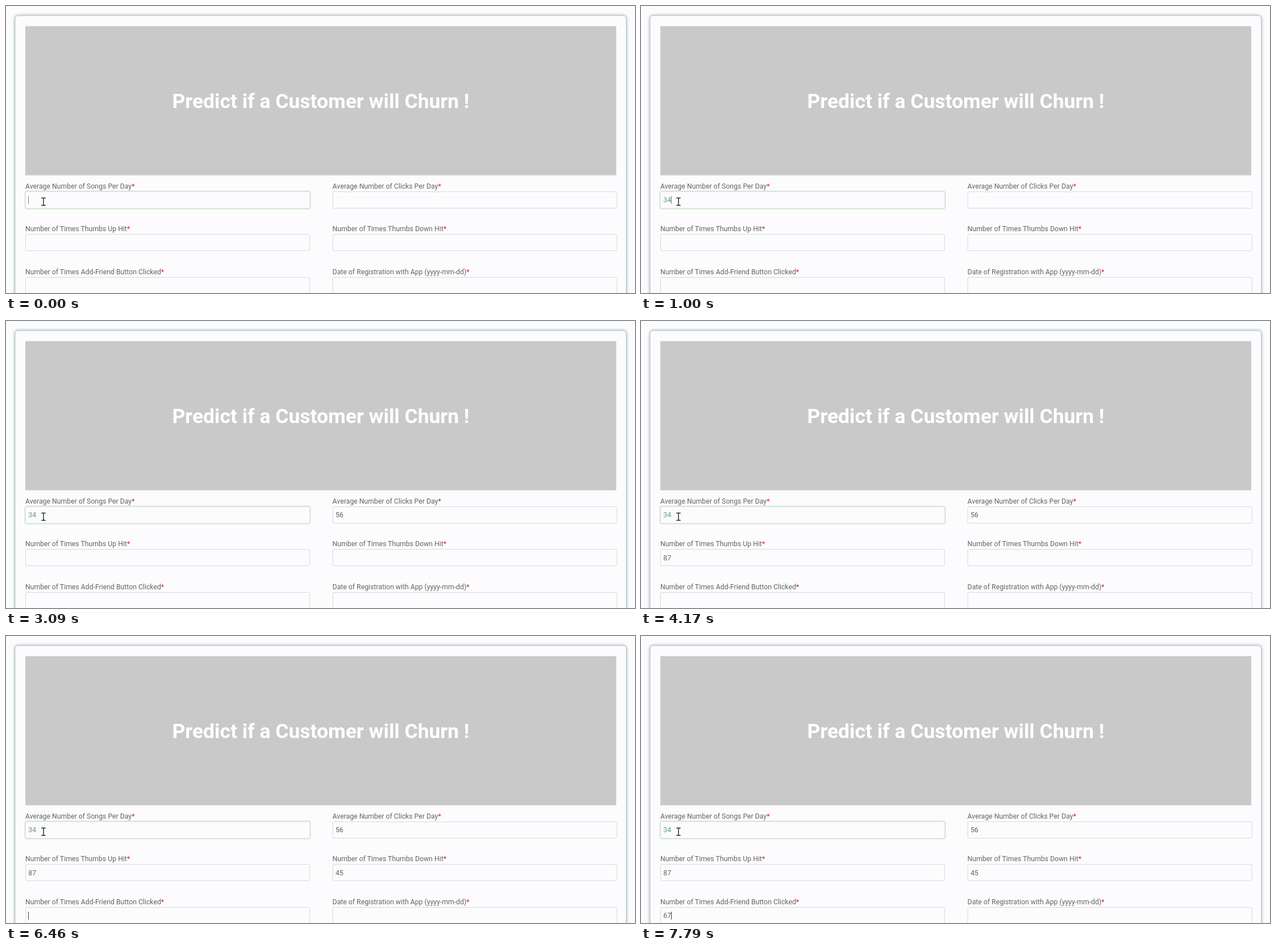
Write an HTML page that moves like this. It is 1107 px wide and 506 px high and loops after 8000 ms.

```html
<!DOCTYPE html>
<html lang="en">
<head>
<meta charset="utf-8">
<title>Churn form</title>
<style>
  html, body { margin: 0; width: 100%; height: 100%; overflow: hidden; background: #fcfcfe; }
  svg { display: block; width: 1107px; height: 506px; font: 12.25px Roboto, sans-serif; }
  .card { fill: #fcfcfe; stroke: #bccbcd; filter: drop-shadow(0 0 2.5px #8fa8a4); }
  .title { font-size: 35.4px; font-weight: 700; fill: #fff; text-anchor: middle; }
  .label { fill: #65655f; }
  .star { fill: #d8202c; }
  .box { fill: #fcfcfe; stroke: #d6dad6; }
  .box.focus { stroke: #c3d9bd; filter: drop-shadow(0 0 1px #c9dcc4); }
  .value { fill: #62625c; }
  .value.focus { fill: #64987f; }
  .caret { fill: #3c3c3c; }
  .caret.focus { fill: #71897c; }
</style>
</head>
<body>
<svg id="stage" viewBox="0 0 1107 506">
  <rect class="card" x="16" y="17" width="1075.5" height="520" rx="5"/>
  <rect x="34" y="35.5" width="1040" height="263" fill="#c9c9c9"/>
  <text class="title" x="554" y="179.5">Predict if a Customer will Churn !</text>
  <g id="form"></g>
  <g fill="none" stroke-linecap="square">
    <path id="beam" d="M63 338.5h2l1 1 1-1h2M66 339.5v11M63 351.5h2l1-1 1 1h2" stroke="#fff" stroke-width="3"/>
    <use href="#beam" style="display:none"/>
    <path d="M63 338.5h2l1 1 1-1h2M66 339.5v11M63 351.5h2l1-1 1 1h2" stroke="#222" stroke-width="1.4"/>
  </g>
</svg>
<script>
const LOOP = 8000, DIGIT = 12.25 * 0.5615;
const labels = [
  'Average Number of Songs Per Day', 'Average Number of Clicks Per Day',
  'Number of Times Thumbs Up Hit', 'Number of Times Thumbs Down Hit',
  'Number of Times Add-Friend Button Clicked', 'Date of Registration with App (yyyy-mm-dd)'
];
// time, field, value, caret shown
const steps = [
  [0, 0, '', 1], [460, 0, '', 0], [630, 0, '3', 1], [710, 0, '34', 1], [1210, 0, '34', 0],
  [1250, 1, '', 1], [1750, 1, '', 0], [2010, 1, '5', 1], [2170, 1, '56', 1],
  [2540, 2, '', 1], [3090, 2, '', 0], [3460, 2, '8', 1], [3630, 2, '87', 1], [4170, 2, '87', 0],
  [4630, 3, '', 1], [5130, 3, '', 0], [5630, 3, '4', 1], [5790, 3, '45', 1], [6290, 3, '45', 0],
  [6460, 4, '', 1], [6960, 4, '', 0], [7500, 4, '6', 1], [7790, 4, '67', 1]
];

function add(parent, tag, attrs, text = '') {
  const el = document.createElementNS('http://www.w3.org/2000/svg', tag);
  for (const key in attrs) el.setAttribute(key, attrs[key]);
  el.textContent = text;
  return parent.appendChild(el);
}

const form = document.getElementById('form');
const fields = labels.map((name, i) => {
  const x = 34 + (i % 2) * 540.6, y = 321.5 + (i >> 1) * 75.5, focus = i ? '' : ' focus';
  const label = add(form, 'text', { class: 'label', x, y }, name);
  add(label, 'tspan', { class: 'star' }, '*');
  const grow = i ? 0 : 0.5;
  add(form, 'rect', {
    class: 'box' + focus, x: x + 0.5 - grow, y: Math.round(y + 5) + 0.5 - grow,
    width: 500 + 2 * grow, height: 29 + 2 * grow, rx: 2
  });
  return {
    x: x + 5.3,
    value: add(form, 'text', { class: 'value' + focus, x: x + 5.3, y: y + 24.8 }),
    caret: add(form, 'rect', { class: 'caret' + focus, y: Math.round(y + 13), width: 1, height: 14 })
  };
});

function draw() {
  const now = performance.now() % LOOP;
  const done = steps.filter(step => step[0] <= now);
  const [, active, , shown] = done[done.length - 1];
  fields.forEach((field, i) => {
    const last = done.filter(step => step[1] === i).pop();
    const text = last ? last[2] : '';
    field.value.textContent = text;
    field.caret.setAttribute('x', Math.round(field.x + text.length * DIGIT));
    field.caret.setAttribute('visibility', i === active && shown ? 'visible' : 'hidden');
  });
  requestAnimationFrame(draw);
}
draw();
</script>
</body>
</html>
```
